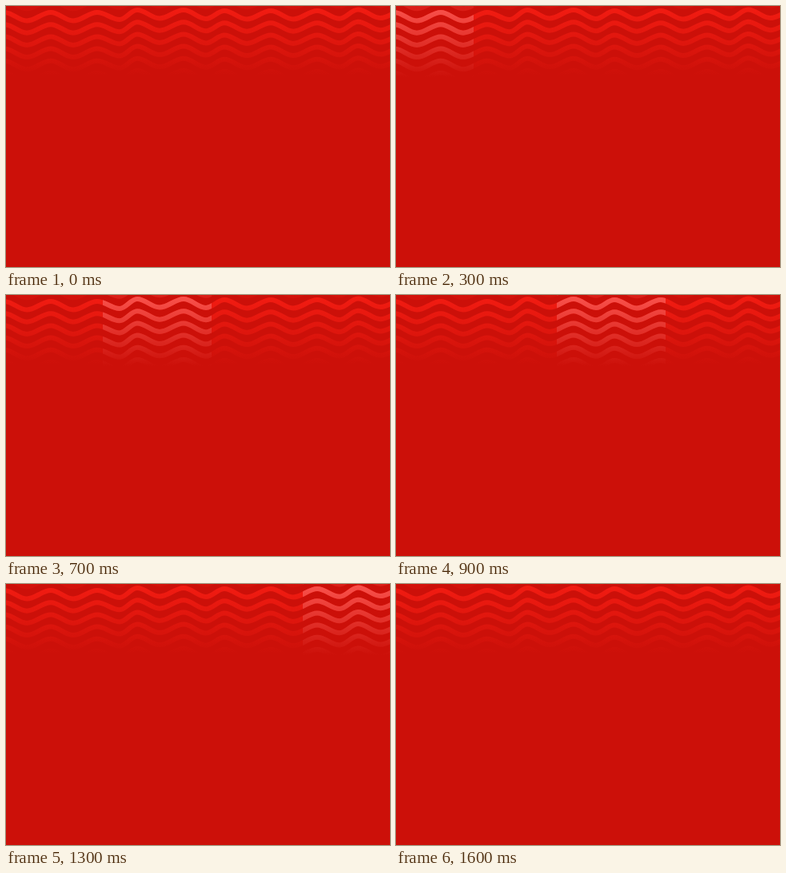
Recreate the animation shown at these times as an HTML page. Size 480 px wide and 327 px high, loop 1700 ms.

```html
<!DOCTYPE html>
<html lang="en">
<head>
<meta charset="utf-8">
<title>Waves</title>
<style>
  html, body { margin: 0; width: 100%; height: 100%; overflow: hidden; background: #cc1009; }
  svg { position: absolute; left: 0; top: 0; width: 480px; height: 327px; }
  path { fill: none; stroke-width: 6; }
  path:first-child { opacity: .2; }
  #waves { stroke: url(#red); }
  #lights { stroke: url(#pink); }
  #shine { animation: sweep 1.7s infinite; }

  /* A 136px window hops 40px every 100ms, with one longer hop at 1100ms */
  @keyframes sweep {
    0% { clip-path: inset(0 503px 0 -159px); animation-timing-function: steps(11); }
    64.704% { clip-path: inset(0 63px 0 281px); animation-timing-function: step-start; }
    64.705% { clip-path: inset(0 53px 0 291px); animation-timing-function: steps(6); }
    100% { clip-path: inset(0 -187px 0 531px); }
  }
</style>
</head>
<body>
<svg viewBox="0 0 480 327">
  <defs>
    <linearGradient id="red" gradientUnits="userSpaceOnUse" x1="0" y1="0" x2="0" y2="87">
      <stop offset="0" stop-color="#f31c12"/>
      <stop offset="1" stop-color="#cc1009"/>
    </linearGradient>
    <linearGradient id="pink" gradientUnits="userSpaceOnUse" x1="0" y1="0" x2="0" y2="89">
      <stop offset="0" stop-color="#fa534d"/>
      <stop offset="1" stop-color="#cc1009"/>
    </linearGradient>
  </defs>
  <g id="waves"></g>
</svg>
<svg id="shine" viewBox="0 0 480 327"><g id="lights"></g></svg>
<script>
  const period = 58, depth = 10.5, rowGap = 15.2, rows = 7;

  // Strips of regular waves, joined end to end: first crest and crest count
  const strips = [
    { x: -2, y: 8, count: 3 },
    { x: 164, y: 5, count: 2 },
    { x: 273, y: 6, count: 3 },
    { x: 440, y: 4.5, count: 2 }
  ];
  const crests = strips.flatMap(({ x, y, count }) =>
    Array.from({ length: count }, (_, i) => ({ x: x + i * period, y })));

  // Half a sine wave from one turning point to the next
  function bend(a, b) {
    const k = (b.x - a.x) * 0.364;
    return `C${a.x + k} ${a.y} ${b.x - k} ${b.y} ${b.x} ${b.y}`;
  }

  const line = crests.slice(1).reduce((d, b, i) => {
    const a = crests[i];
    const trough = { x: a.x + period / 2 - 1, y: (a.y + b.y) / 2 + depth };
    return d + bend(a, trough) + bend(trough, b);
  }, `M${crests[0].x} ${crests[0].y}`);

  const stack = Array.from({ length: rows }, (_, i) => {
    const dy = (i - 1) * rowGap;
    // Shift the points, not the element, so the gradient stays fixed to the stage
    const d = line.replace(/(\S+) (\S+?)(?=[C ]|$)/g, (_, x, y) => `${x} ${+y + dy}`);
    return `<path d="${d}"/>`;
  }).join('');

  for (const id of ['waves', 'lights']) document.getElementById(id).innerHTML = stack;
</script>
</body>
</html>
```
